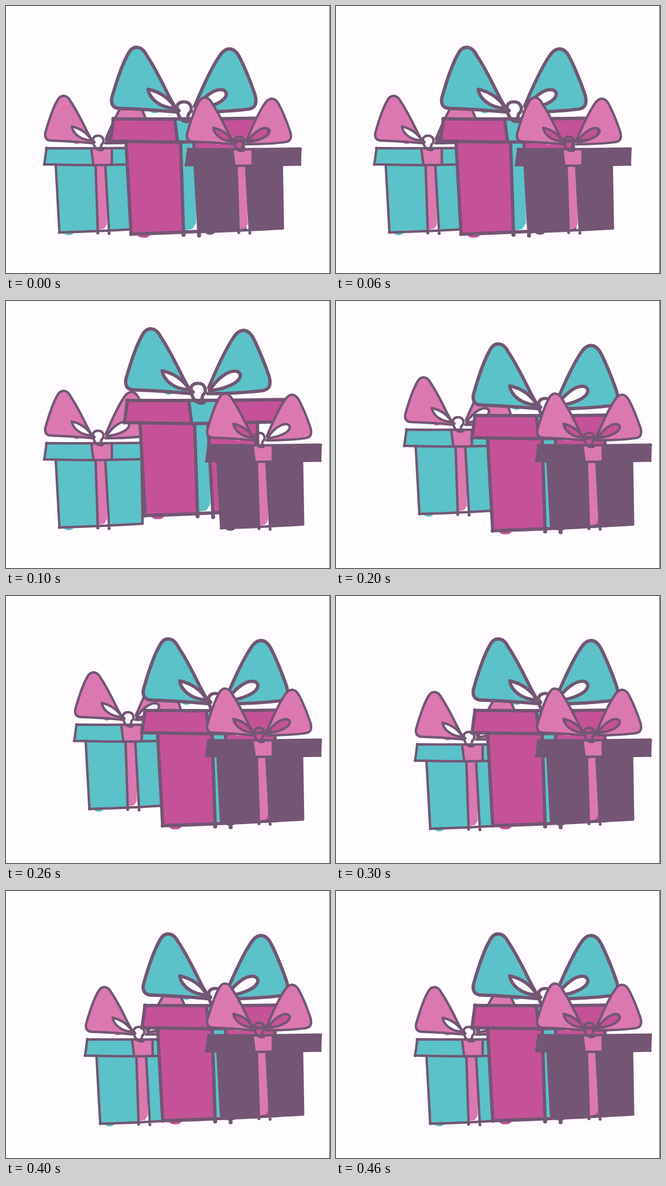
These frames come from a looping animation (600x494 px, 0.5 s). An HTML page:

```html
<!DOCTYPE html>
<html lang="en">
<head>
<meta charset="utf-8">
<title>Hopping gifts</title>
<style>
  html, body { margin: 0; width: 100%; height: 100%; overflow: hidden; background: #fefcff; }
  svg { display: block; width: 600px; height: 494px; }
  .box { fill: var(--box); }
  .trim { fill: var(--trim); }
  .ink { fill: none; stroke: #735673; stroke-width: 4.5; stroke-linecap: round; stroke-linejoin: round; }
  .dots { stroke-width: 5.6; }
  #left { --box: #5bc2c7; --trim: #db78b0; }
  #middle { --box: #c55296; --trim: #5bc2c7; }
  #right { --box: #735673; --trim: #db78b0; }
</style>
</head>
<body>
<svg viewBox="0 0 600 494">
  <defs>
    <path id="leftLoop" d="M160 249C151 238 140 207 120 177C113 163 101 163 95 175C86 190 79 213 73 234C71 244 75 249 85 249Q120 250 162 254"/>
    <path id="rightLoop" d="M185 246C190 234 204 200 218 179C226 166 237 164 245 178C252 191 262 216 267 231C270 243 267 249 257 250Q225 254 184 254"/>
    <path id="leftLeaf" d="M159 249C152 237 140 227 122 223C124 236 138 248 159 249Z"/>
    <path id="rightLeaf" d="M186 250C196 234 212 221 224 224C232 228 227 237 216 242C206 247 197 249 186 250Z"/>
    <g id="gift">
      <!-- box and lid -->
      <ellipse class="box" cx="116" cy="420" rx="8.5" ry="4"/>
      <path class="box" d="M92 293L167 295 171 417 99 419ZM184 295L251 292 252 412 191 416Z"/>
      <path class="box" d="M75 263L287 262 286 292 140 296 71 293Z"/>
      <!-- ribbon -->
      <path class="trim" d="M167 296L183 296 186 345 187 404 182 412 171 414Z"/>
      <path class="trim" d="M158 264L196 263 196 294 162 295Z"/>
      <path class="ink" d="M92 293L99 419Q170 417 253 412L251 293M166 296L170 420M184 296L191 421"/>
      <path class="ink" d="M75 263Q180 264 286 262L285 292Q230 293 190 294T71 293ZM158 264L162 295M196 263L196 294"/>
      <path class="ink dots" d="M75 263h0M71 293h0M99 419h0M170 420h0M191 421h0M286 263h0M285 292h0"/>
      <!-- bow: the leaves are holes -->
      <ellipse class="trim" cx="131" cy="252" rx="6" ry="3.5"/>
      <g class="trim" fill-rule="evenodd">
        <path d="M160 249C151 238 140 207 120 177C113 163 101 163 95 175C86 190 79 213 73 234C71 244 75 249 85 249Q120 250 162 254Z
                 M159 249C152 237 140 227 122 223C124 236 138 248 159 249Z"/>
        <path d="M185 246C190 234 204 200 218 179C226 166 237 164 245 178C252 191 262 216 267 231C270 243 267 249 257 250Q225 254 184 254Z
                 M186 250C196 234 212 221 224 224C232 228 227 237 216 242C206 247 197 249 186 250Z"/>
      </g>
      <g class="ink">
        <use href="#leftLoop"/>
        <use href="#rightLoop"/>
        <use href="#leftLeaf"/>
        <use href="#rightLeaf"/>
        <path d="M164 252C157 246 164 239.5 171 240C180 240 184 251 177 256L175 264M162 254C164 262 169 269 179 266"/>
      </g>
    </g>
  </defs>
  <g id="left"><use href="#gift"/></g>
  <g id="middle"><use href="#gift" transform="translate(96.4 -150.8) scale(1.367)"/></g>
  <g id="right"><use href="#gift" transform="translate(263.5 5.6) scale(.985)"/></g>
  <path d="M599 0h1v494h-1z" fill="#444"/>
</svg>
<script>
  const STEP = 100, STEPS = 5;
  // Each gift hops between held positions: [step, x, y]
  const hops = {
    left: [[0, 0, 0], [2, 55.5, -25], [3, 75.5, 11.5]],
    middle: [[0, 0, 0], [1, 26, -25], [2, 58.5, 3]],
    right: [[0, 0, 0], [1, 37.5, 2]],
  };

  function draw() {
    const step = Math.floor(performance.now() / STEP) % STEPS;
    for (const id in hops) {
      const [, x, y] = hops[id].findLast(([start]) => start <= step);
      document.getElementById(id).setAttribute("transform", `translate(${x} ${y})`);
    }
    requestAnimationFrame(draw);
  }
  draw();
</script>
</body>
</html>
```
